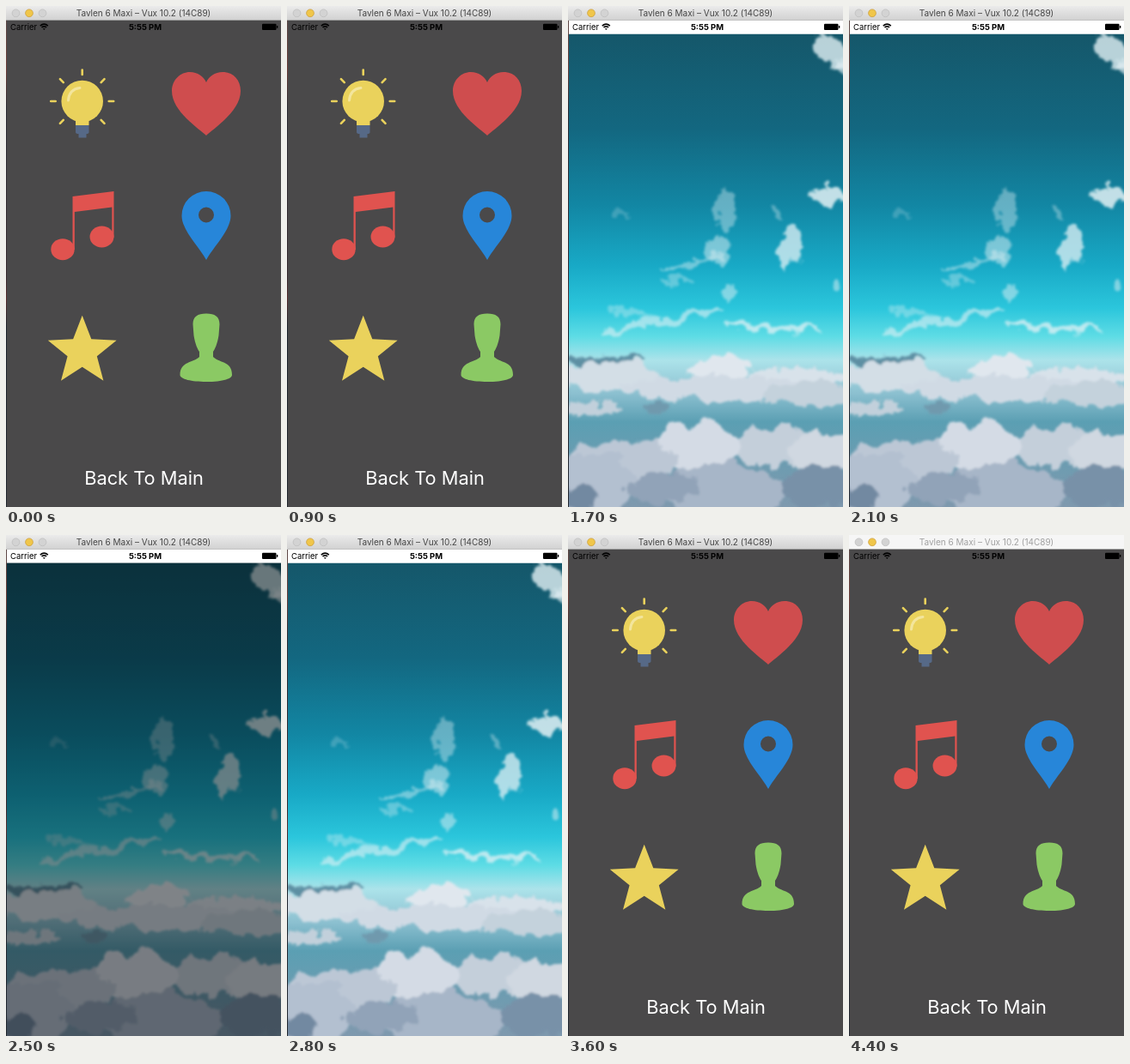
Write an HTML page that moves like this. It is 320x584 px and loops after 4.5 s.

```html
<!DOCTYPE html>
<html lang="en">
<head>
<meta charset="utf-8">
<title>Sliding icon menu</title>
<style>
  html, body { margin: 0; width: 100%; height: 100%; overflow: hidden; background: #4a494a; }
  svg { position: absolute; left: 0; top: 0; width: 320px; height: 584px; overflow: hidden; }
  #scene { will-change: transform; }
  text { font-family: Inter, Roboto, sans-serif; }
</style>
</head>
<body>
<svg id="scene" viewBox="0 0 320 584">
  <defs>
    <linearGradient id="air" gradientUnits="userSpaceOnUse" x1="0" y1="32" x2="0" y2="584">
      <stop offset="0" stop-color="#15576a"/>
      <stop offset=".2" stop-color="#136780"/>
      <stop offset=".36" stop-color="#1286a3"/>
      <stop offset=".49" stop-color="#18a9c6"/>
      <stop offset=".58" stop-color="#2bc6dc"/>
      <stop offset=".64" stop-color="#5edce5"/>
      <stop offset=".69" stop-color="#ace3ea"/>
      <stop offset=".76" stop-color="#8cc0d0"/>
      <stop offset=".82" stop-color="#5b9fb3"/>
      <stop offset="1" stop-color="#7f99ae"/>
    </linearGradient>
    <filter id="fluff" filterUnits="userSpaceOnUse" x="-40" y="0" width="400" height="640">
      <feTurbulence type="fractalNoise" baseFrequency=".045" numOctaves="4" seed="8"/>
      <feDisplacementMap in="SourceGraphic" scale="26" xChannelSelector="R" yChannelSelector="G" result="ragged"/>
      <feGaussianBlur in="ragged" stdDeviation="1.8"/>
    </filter>
  </defs>
  <rect width="320" height="584" fill="#fff"/>
  <rect y="32.5" width="320" height="552" fill="url(#air)"/>
  <g id="clouds" filter="url(#fluff)"></g>
  <rect width="320" height="32.5" fill="#fff"/>
</svg>

<svg id="screen" viewBox="0 0 320 584">
  <defs>
    <linearGradient id="chrome" x2="0" y2="1">
      <stop offset="0" stop-color="#ebebeb"/>
      <stop offset="1" stop-color="#d1d1d1"/>
    </linearGradient>
    <linearGradient id="desk" x2="0" y2="1">
      <stop offset="0" stop-color="#5d4a48"/>
      <stop offset=".1" stop-color="#70403b"/>
      <stop offset=".18" stop-color="#2d2e36"/>
      <stop offset=".53" stop-color="#3a2c32"/>
      <stop offset=".57" stop-color="#5b3031"/>
      <stop offset=".63" stop-color="#20262f"/>
      <stop offset="1" stop-color="#252a32"/>
    </linearGradient>
  </defs>

  <rect id="press" y="32.5" width="320" height="552" opacity=".43"/>

  <g id="menu">
    <rect y="16" width="320" height="568" fill="#4a494a"/>

    <g class="icon" data-shift="-232" fill="#ead25c">
      <circle cx="88.7" cy="111" r="24.3"/>
      <rect x="81" y="130" width="15.5" height="9"/>
      <path d="M72.5 110Q73.500 97 86 95.500" fill="none" stroke="#f3e59c" stroke-width="3" stroke-linecap="round"/>
      <path d="M81 139H96.500V147Q96.500 149 93.500 149V153.500H84.500V149Q81 149 81 147Z" fill="#566987"/>
      <path id="rays" stroke="#ead25c" stroke-width="2.6" stroke-linecap="round"/>
    </g>

    <path class="icon" data-shift="232" fill="#cf4d4e"
      d="M233 151C225 143 193 123 193 99C193 86 203 77 214 77C223 77 230 82 233 89C236 82 243 77 252 77C264 77 273 86 273 99C273 123 241 143 233 151Z"/>

    <g class="icon" data-shift="-116" fill="#e0534f">
      <ellipse cx="66" cy="283.700" rx="13.700" ry="12.500"/>
      <ellipse cx="111.500" cy="269" rx="14" ry="12.500"/>
      <path d="M77.500 222L125.500 216V270H123.300V234.500L79.800 240V284H77.500Z"/>
    </g>

    <path class="icon" data-shift="116" fill="#2786d9" fill-rule="evenodd"
      d="M233 296C226 282 204.500 262 204.500 244.500a28.500 28.500 0 0 1 57 0C261.500 262 240 282 233 296ZM224 243.500a9 9 0 1 0 18 0a9 9 0 1 0 -18 0Z"/>

    <polygon id="star" class="icon" data-shift="-38.600" fill="#ead25c"/>

    <path class="icon" data-shift="38.600" fill="#8bc964"
      d="M217.500 371C217.500 362 223 358.500 233 358.500S248.500 362 248.500 371L247.500 384C246 394 243 400 241 403V409C248 416 263 414 263 430C263 435 250 438 233 438S202.500 435 202.500 430C202.500 414 218 416 225 409V403C223 400 220 394 218.500 384Z"/>

    <text id="back" x="160.500" y="558" font-size="21.800" text-anchor="middle" fill="#fff">Back To Main</text>
  </g>

  <g font-size="9.500">
    <text x="5" y="28.300">Carrier</text>
    <text x="162" y="28.300" font-weight="700" text-anchor="middle">5:55 PM</text>
  </g>
  <g fill="none" stroke="#000" stroke-width="1.600">
    <path d="M39.800 23.200Q44.300 19.200 48.800 23.200M41.500 25Q44.300 22.600 47.100 25"/>
    <path d="M42.800 26.300H45.800L44.300 28Z" fill="#000" stroke="none"/>
  </g>
  <rect x="298" y="20.800" width="16.500" height="7.200" rx="1"/>
  <rect x="315" y="23" width="1.300" height="2.800"/>

  <rect y="17" width="1" height="567" fill="url(#desk)"/>

  <rect id="bar" width="320" height="16.500"/>
  <path d="M0 16.500H320" stroke="#a9a9a9" stroke-width=".6"/>
  <g stroke-width=".7">
    <circle cx="11.500" cy="8.300" r="4.400" fill="#d3d3d3" stroke="#bcbcbc"/>
    <circle cx="27" cy="8.300" r="4.400" fill="#f0c64a" stroke="#c99a35"/>
    <circle cx="42.500" cy="8.300" r="4.400" fill="#d3d3d3" stroke="#bcbcbc"/>
  </g>
  <text id="title" x="160" y="12.300" font-size="10" text-anchor="middle">Tavlen 6 Maxi – Vux 10.2 (14C89)</text>
</svg>

<script>
const LOOP = 4500;
const BACK_DOWN = 1000, CLOSE = 1356;
const SKY_DOWN = 2400, OPEN = 2800;
const WINDOW_BLUR = 4000;

const get = id => document.getElementById(id);
const [press, menu, back, bar, title] = ['press', 'menu', 'back', 'bar', 'title'].map(get);
const icons = [...document.querySelectorAll('.icon')];

// x, y, rx, ry, rotation, opacity
const wisps = [
  [308, 52, 24, 17, 30, .8], [321, 70, 9, 14, 0, .7], [302, 222, 17, 14, 0, .85],
  [258, 280, 15, 27, 15, .75], [186, 238, 10, 30, -5, .4], [176, 283, 14, 16, 30, .5],
  [145, 298, 42, 3, -14, .45], [125, 318, 18, 4, 0, .35], [187, 332, 9, 5, -15, .5],
  [108, 367, 76, 5, -11, .6], [75, 358, 26, 4, 10, .35], [240, 375, 54, 4, 2, .75],
  [317, 327, 6, 8, 0, .5], [60, 243, 8, 5, 0, .22], [245, 240, 5, 8, 0, .35]
];
// x, y, rx, ry, color
const banks = [
  [45, 413, 46, 5, '#5d8fa3'], [48, 433, 62, 19, '#d3dee6'], [178, 421, 38, 13, '#e0e7ee'],
  [265, 432, 55, 11, '#d8e2ea'], [180, 445, 118, 15, '#d0dae4'], [285, 452, 55, 15, '#c4d2dc'],
  [28, 470, 34, 7, '#c2d0db'], [105, 467, 18, 6, '#7099ad'],
  [245, 513, 62, 23, '#c4cfda'], [150, 515, 52, 30, '#d4dbe5'], [65, 528, 60, 22, '#bcc7d5'],
  [300, 520, 45, 25, '#d0d8e1'], [25, 558, 55, 35, '#b3c0d0'], [180, 566, 75, 32, '#a7b6c8'],
  [110, 562, 42, 19, '#91a3b8'], [290, 560, 45, 24, '#7891a8'], [10, 572, 26, 14, '#7289a1']
];
const ellipse = (x, y, rx, ry, turn, opacity, color) =>
  `<ellipse cx="${x}" cy="${y}" rx="${rx}" ry="${ry}" fill="${color}" opacity="${opacity}" transform="rotate(${turn} ${x} ${y})"/>`;
get('clouds').innerHTML =
  wisps.map(w => ellipse(...w, '#e2f0f4')).join('') +
  banks.map(([x, y, rx, ry, color]) => ellipse(x, y, rx, ry, 0, 1, color)).join('');

const polar = (cx, cy, r, degrees) => {
  const a = degrees * Math.PI / 180;
  return `${(cx + r * Math.cos(a)).toFixed(2)} ${(cy + r * Math.sin(a)).toFixed(2)}`;
};
get('rays').setAttribute('d', [90, 135, 180, 225, 270, 315, 360].filter(a => a !== 90)
  .concat(45).map(a => `M${polar(88.7, 111, 31, a)}L${polar(88.7, 111, 36.5, a)}`).join(''));
get('star').setAttribute('points', Array.from({ length: 10 }, (_, i) =>
  polar(88.7, 402.7, i % 2 ? 18 : 42, i * 36 - 90)).join(' '));

// Remaining distance of a spring with damping ratio 0.8.
function spring(ms) {
  const x = 19.2 * ms / 1000;
  return Math.exp(-.8 * x) * (Math.cos(.6 * x) + 4 / 3 * Math.sin(.6 * x));
}

function openness(t) {
  if (t < CLOSE) return 1;
  return t < OPEN ? spring(t - CLOSE) : 1 - spring(t - OPEN);
}

function draw(t) {
  const open = openness(t);
  menu.setAttribute('opacity', Math.min(1, Math.max(0, open)));
  for (const icon of icons)
    icon.setAttribute('transform', `translate(${icon.dataset.shift * (1 - open)} 0)`);

  back.setAttribute('opacity', t >= BACK_DOWN && t < OPEN ? .2 : 1);
  press.setAttribute('visibility', t >= SKY_DOWN && t < OPEN ? 'visible' : 'hidden');

  const active = t < WINDOW_BLUR;
  bar.setAttribute('fill', active ? 'url(#chrome)' : '#f6f6f6');
  title.setAttribute('fill', active ? '#454545' : '#a0a0a0');
}

const start = performance.now();
function tick() {
  draw((performance.now() - start) % LOOP);
  requestAnimationFrame(tick);
}
tick();
</script>
</body>
</html>
```
